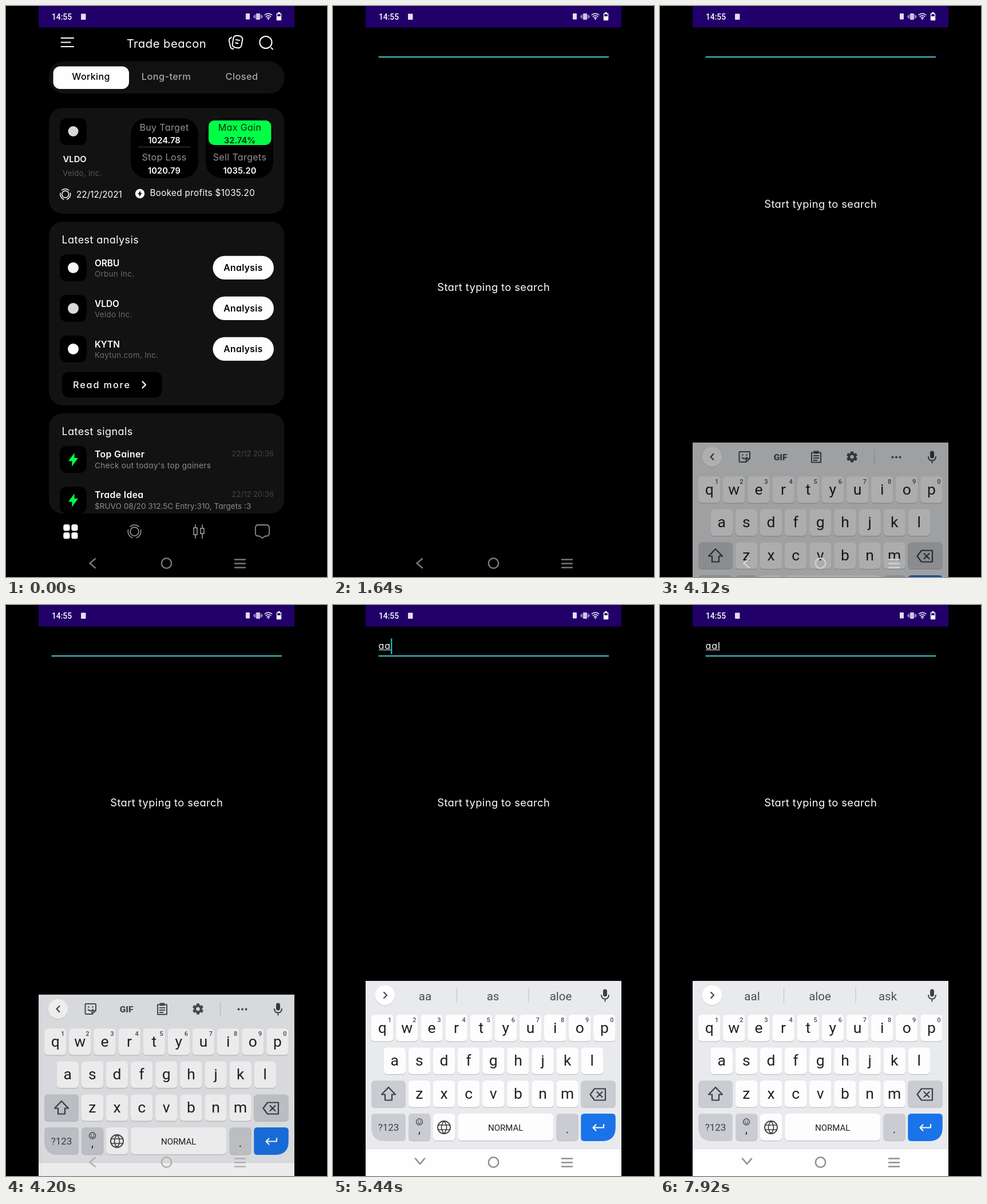
Animation, 561 px wide and 998 px high, one loop 8000 ms. Source, as an HTML page:

```html
<!DOCTYPE html>
<html lang="en">
<head>
<meta charset="utf-8">
<title>Stock app search</title>
<style>
html, body { margin: 0; width: 100%; height: 100%; overflow: hidden; background: #000; }
svg { display: block; width: 100vw; height: 100vh; }
text { font-family: Inter, "Open Sans", sans-serif; font-feature-settings: "cv11"; letter-spacing: .023em; white-space: pre; }
.num { letter-spacing: 0; }
.wide { letter-spacing: 1.9px; }
.typed { letter-spacing: .9px; }
.sys { font-family: Roboto, Arial, sans-serif; letter-spacing: 0; }
.line { fill: none; stroke-linecap: round; stroke-linejoin: round; }

.home, .search, .cursor, .message, .tools, .words, .press, .board, .nav, .back {
  animation: 8s step-end infinite both;
}
.home { animation-name: home; }
.search { animation-name: search; }
.cursor { animation-name: cursor; }
.message { animation-name: message; }
.tools { animation-name: tools; }
.w1 { animation-name: w1; }
.w2 { animation-name: w2; }
.w3 { animation-name: w3; }
.press-a { animation-name: pressA; }
.press-l { animation-name: pressL; }
.board { animation-name: board; }
.nav { animation-name: nav; animation-timing-function: linear; }
.back { animation-name: back; transform-origin: 151.5px 973.5px; }

@keyframes home { 0% { opacity: 1 } 19%, 100% { opacity: 0 } }
@keyframes search { 0% { opacity: 0 } 19%, 100% { opacity: 1 } }
@keyframes cursor {
  0%, 31.5%, 43.5%, 50% { opacity: 0; transform: none }
  25%, 37.5%, 44%, 56.5% { opacity: 1; transform: none }
  62.5% { opacity: 0; transform: none }
  64.5% { opacity: 1; transform: translateX(10.7px) }
  67.5% { opacity: 1; transform: translateX(21px) }
  74% { opacity: 0; transform: translateX(21px) }
  78.5%, 91% { opacity: 1; transform: translateX(25px) }
  84.5%, 97%, 100% { opacity: 0; transform: translateX(25px) }
}
@keyframes message { 0% { transform: translateY(146px) } 50.5% { transform: translateY(.7px) } 52%, 100% { transform: none } }
@keyframes board {
  0% { transform: translateY(345px); opacity: 0 }
  50% { transform: translateY(341px); opacity: 0; animation-timing-function: cubic-bezier(.333, .667, .667, 1) }
  53.42%, 100% { transform: none; opacity: 1 }
}
@keyframes nav { 0%, 50% { stroke: #777 } 51.5% { stroke: #d2d2d2 } 53.5%, 100% { stroke: #8e8e8e } }
@keyframes back {
  0% { transform: none }
  52% { transform: none; animation-timing-function: ease-in-out }
  57.25%, 100% { transform: translateY(-1.5px) rotate(-90deg) }
}
@keyframes tools { 0% { opacity: 1 } 64.5%, 100% { opacity: 0 } }
@keyframes w1 { 0% { opacity: 0 } 64.5% { opacity: 1 } 67.5%, 100% { opacity: 0 } }
@keyframes w2 { 0% { opacity: 0 } 67.5% { opacity: 1 } 78.5%, 100% { opacity: 0 } }
@keyframes w3 { 0% { opacity: 0 } 78.5%, 100% { opacity: 1 } }
@keyframes pressA { 0%, 64.5%, 67.5%, 100% { opacity: 0 } 63.5%, 66.5% { opacity: 1 } }
@keyframes pressL { 0%, 78.5%, 100% { opacity: 0 } 76% { opacity: 1 } }
</style>
</head>
<body>
<svg id="stage" viewBox="0 0 561 998" preserveAspectRatio="none"></svg>
<script>
const rect = (x, y, w, h, r, fill) =>
  `<rect x="${x}" y="${y}" width="${w}" height="${h}" rx="${r}" fill="${fill}"/>`;
const disc = (x, y, r, fill) => `<circle cx="${x}" cy="${y}" r="${r}" fill="${fill}"/>`;
const ring = (x, y, r, color, w) =>
  `<circle class="line" cx="${x}" cy="${y}" r="${r}" stroke="${color}" stroke-width="${w}"/>`;
const line = (d, color, w) => `<path class="line" d="${d}" stroke="${color}" stroke-width="${w}"/>`;
const fill = (d, color) => `<path d="${d}" fill="${color}"/>`;
const group = (cls, ...parts) => `<g class="${cls}">${parts.join('')}</g>`;
const at = (x, y, ...parts) => `<g transform="translate(${x} ${y})">${parts.join('')}</g>`;

function text(x, y, str, size, color, { anchor = 'start', weight = 400, cls = '' } = {}) {
  return `<text x="${x}" y="${y}" font-size="${size}" fill="${color}" text-anchor="${anchor}"` +
    ` font-weight="${weight}" class="${cls}">${str}</text>`;
}
const mid = (x, y, str, size, color, weight = 400, cls = '') =>
  text(x, y, str, size, color, { anchor: 'middle', weight, cls });

const CARD = '#121212', GREEN = '#00ff47', GREY = '#949494', INK = '#202124', TOOL = '#4a4c50';
const BOLT = 'M2 -12L-8.5 2.5H-2L-2.5 12L8.5 -3H2Z';

// Ring between three arcs
const target = (x, y, k, color, w) => at(x, y, ring(0, 0, 6 * k, color, w),
  line(`M${-6 * k} ${-7 * k}A${9.2 * k} ${9.2 * k} 0 0 1 ${6 * k} ${-7 * k}` +
    `M${-8.8 * k} ${-2 * k}A${9.2 * k} ${9.2 * k} 0 0 0 ${-3 * k} ${8.7 * k}` +
    `M${8.8 * k} ${-2 * k}A${9.2 * k} ${9.2 * k} 0 0 1 ${3 * k} ${8.7 * k}`, color, w));

function statusBar() {
  return rect(57, 0, 447, 37.5, 0, '#210069') +
    text(80, 24, '14:55', 13.8, '#fff', { weight: 500, cls: 'sys' }) +
    rect(131, 13.5, 8.5, 10.5, 1, '#e4dcf2') +
    rect(419, 13, 7, 10.5, 1, '#e4dcf2') +
    rect(437, 13, 7, 11, 1, '#cfc3e6') +
    line('M435.3 15.5v6M445.7 15.5v6M433.3 17v3M447.7 17v3', '#e4dcf2', 1.1) +
    line('M452.3 15.5q6.2 -4.6 12.4 0M454.2 18.3q4.3 -3.2 8.6 0M456.2 20.8q2.3 -1.6 4.6 0', '#fff', 1.5) +
    disc(458.5, 22.8, 1.2, '#fff') +
    rect(475, 11, 4, 3, .5, '#fff') +
    line('M473.5 13.5h7v11h-7z', '#fff', 1.4) + rect(473, 18, 8, 7, 1, '#fff');
}

function header() {
  const sheet = `<rect class="line" x="-8" y="-10.5" width="16" height="21" rx="5.5" stroke="#fff" stroke-width="2"/>`;
  return line('M96.5 56h21.5M96.5 63.5h16M96.5 71h21.5', '#fff', 2) +
    mid(280.5, 73, 'Trade beacon', 20.3, '#fff') +
    at(404.5, 62.5, `<g transform="rotate(10)">${sheet}${line('M-3 -3h6.5M-3 2.5h4.5', '#fff', 1.9)}</g>`) +
    line('M394 55q-5 2 -4 6.500l2 9q1 4.500 5.500 4.500', '#fff', 1.9) +
    ring(454, 63.5, 10.6, '#fff', 2) + line('M463.5 73l2.5 2.5', '#fff', 2);
}

function tabs() {
  return rect(75, 97, 411.5, 56, 26, '#111') + rect(82.5, 105.5, 132.5, 39.5, 12, '#fefefe') +
    mid(148.5, 129, 'Working', 16, '#000', 550) +
    mid(280, 129, 'Long-term', 16.4, '#a6a6a6', 500) +
    mid(412, 129, 'Closed', 16.4, '#a6a6a6', 500);
}

const tile = y => rect(94, y, 47, 47, 12, '#000');
const pair = (x, y, label, value, color, ink) =>
  mid(x, y, label, 16, color) + mid(x, y + 22.5, value, 14.8, ink, 600, 'num');

function signalCard() {
  return rect(75, 178, 411.5, 185, 24, CARD) + tile(196) + disc(117.5, 219, 9, '#d9d9d9') +
    text(99.5, 273, 'VLDO', 14.8, '#fff', { weight: 600, cls: 'num' }) +
    text(99, 297, 'Veldo, Inc.', 13.2, '#595959') +
    rect(218, 196, 118, 105, 28, '#000') + rect(349, 196, 118, 105, 28, '#000') +
    rect(354, 200, 109.5, 43, 10, GREEN) +
    pair(276.5, 217.5, 'Buy Target', '1024.78', GREY, '#fff') +
    line('M231 246.5h91', '#333', 1.3) +
    pair(276.5, 270, 'Stop Loss', '1020.79', GREY, '#fff') +
    pair(408.5, 217.5, 'Max Gain', '32.74%', '#04260e', '#04260e') +
    pair(408.5, 270, 'Sell Targets', '1035.20', GREY, '#fff') +
    target(103.7, 329, 1, '#fff', 1.6) +
    text(123, 335, '22/12/2021', 15.3, '#fff', { cls: 'num' }) +
    disc(234, 328, 8.2, '#fff') +
    at(234, 328, `<g transform="scale(.45)">${fill(BOLT, CARD)}</g>`) +
    text(251.5, 332, 'Booked profits $1035.20', 15.2, '#fff');
}

function analysisCard() {
  const stocks = [['ORBU', 'Orbun Inc.', '#f5f5f5'], ['VLDO', 'Veldo Inc.', '#d9d9d9'], ['KYTN', 'Kaytun.com, Inc.', '#fff']];
  const rows = stocks.map(([ticker, name, color], i) => {
    const y = 434 + 71 * i;
    return tile(y) + disc(117.5, y + 23.5, 9.5, color) +
      text(155, y + 21, ticker, 15.4, '#fff', { weight: 600, cls: 'num' }) +
      text(155, y + 39, name, 13.4, '#6b6b6b') +
      rect(361.5, y + 2.7, 106.5, 41.3, 20.6, '#fefefe') +
      mid(414.5, y + 29, 'Analysis', 15.7, '#000', 600);
  });
  return rect(75, 377, 411.5, 321, 24, CARD) +
    text(97.5, 415, 'Latest analysis', 18, '#fff') + rows.join('') +
    rect(98, 639.5, 174.5, 45, 12, '#000') +
    text(117, 667.5, 'Read more', 16.2, '#fff', { weight: 550, cls: 'wide' }) +
    line('M238.5 656.5l5.5 5.5l-5.5 5.5', '#fff', 2.3);
}

function newsCard() {
  const items = [['Top Gainer', "Check out today's top gainers", ''],
    ['Trade Idea', '$RUVO 08/20 312.5C Entry:310, Targets :3', 'num']];
  const rows = items.map(([title, note, cls], i) => {
    const y = 769 + 71 * i;
    return tile(y) + at(117.5, y + 24, fill(BOLT, GREEN)) +
      text(155, y + 20, title, 15.8, '#fff', { weight: 580 }) +
      text(155, y + 39, note, 13.6, '#8c8c8c', { cls }) +
      text(468, y + 18, '22/12 20:36', 13, '#454545', { anchor: 'end', cls: 'num' });
  });
  return `<clipPath id="news"><rect x="75" y="712" width="411.5" height="175" rx="24"/></clipPath>` +
    `<g clip-path="url(#news)">${rect(75, 712, 411.5, 175, 0, CARD)}` +
    text(97.5, 750, 'Latest signals', 18, '#fff') + rows.join('') + '</g>';
}

function tabBar() {
  const squares = [0, 1, 2, 3].map(i => rect(100.3 + 14 * (i % 2), 906 + 14 * (i >> 1), 11.2, 11.2, 3.5, '#fff'));
  return squares.join('') + target(224.5, 918.5, 1.25, '#8a8a8a', 1.8) +
    line('M328 912h6v12h-6zM331 907v5M331 924v6M340 913h6v9h-6zM343 907v6M343 922v8', '#8a8a8a', 1.8) +
    line('M441 907h14q5 0 5 5v10q0 4.5 -5 4.5h-2l-5 3.5l-5 -3.5h-2q-5 0 -5 -4.5v-10q0 -5 5 -5z', '#8a8a8a', 1.8);
}

// Keyboard
const keyBox = (x, y, w, color, h = 46.5) =>
  rect(x, y + 1.2, w, h, 6, '#bfc1c5') + rect(x, y, w, h, 6, color);
const WHITE = '#fdfdfd', DIM = '#cbccd2', STEP = 43.13;
const rowsOfKeys = [['qwertyuiop', 86.2, 716], ['asdfghjkl', 107.8, 773.5], ['zxcvbnm', 150.9, 831.3]];

function letters() {
  return rowsOfKeys.map(([keys, x0, y], row) => [...keys].map((k, i) => {
    const x = x0 + STEP * i;
    return keyBox(x - 19.2, y, 38.4, WHITE) + mid(x, y + 31.5, k, 26.5, INK, 400, 'sys') +
      (row ? '' : mid(x + 13, y + 13, (i + 1) % 10, 11, TOOL, 500, 'sys'));
  }).join('')).join('');
}

function controls() {
  const corner = (x, flip, color) =>
    fill(flip ? `M${x} 895q0 -6 6 -6h48.5q6 0 6 6v18q0 24 -24 24h-30.5q-6 0 -6 -6z`
      : `M${x} 895q0 -6 6 -6h48q6 0 6 6v36q0 6 -6 6h-30q-24 0 -24 -24z`, color);
  return keyBox(67, 831.3, 60, DIM) + keyBox(433.3, 831.3, 60.5, DIM) +
    line('M97 843l12 12.5h-6v10h-12v-10h-6z', '#3c4043', 2.2) +
    line('M457 845.5h19v20h-19l-7.5 -10zM461.5 851l9 9M470.5 851l-9 9', '#3c4043', 2.2) +
    corner(67, false, DIM) + mid(97, 919, '?123', 17, '#3c4043', 400, 'sys') +
    keyBox(132, 889, 38.4, DIM, 47) + ring(151, 903.5, 5.5, '#3c4043', 1.3) +
    disc(149, 902, .9, '#3c4043') + disc(153, 902, .9, '#3c4043') + line('M148.5 905q2.5 2.6 5 0', '#3c4043', 1.2) +
    mid(151, 923, ',', 20, INK, 400, 'sys') +
    keyBox(175, 889, 38.4, WHITE, 47) + ring(194, 913, 11, '#3c4043', 1.8) +
    line('M183.5 909h21M183.5 917h21M194 902q-9 11 0 22q9 -11 0 -22', '#3c4043', 1.6) +
    keyBox(218.2, 889, 167, WHITE, 47) + mid(301.7, 918.5, 'NORMAL', 15, INK, 400, 'sys') +
    keyBox(390.5, 889, 38.4, DIM, 47) + mid(409.5, 923, '.', 20, INK, 400, 'sys') +
    corner(433.3, true, '#1a73e8') +
    line('M473 908v5.5h-18M459.5 908.5l-5 5l5 5', '#fff', 2.2);
}

function toolbar() {
  const teeth = [0, 60, 120, 180, 240, 300].map(a =>
    `<g transform="rotate(${a})">${rect(-2.7, -9.5, 5.4, 4.5, 1, TOOL)}</g>`).join('');
  return disc(91, 683.2, 17.5, '#cfd1d5') + disc(91, 682, 17.3, '#fff') +
    group('tools',
      line('M93.5 677l-5 5l5 5', '#3c4043', 2),
      line('M140 673h15.5q1.5 0 1.5 1.5v10l-6.5 6.5h-10.5q-1.5 0 -1.5 -1.5v-15q0 -1.5 1.5 -1.5M157 685h-5q-1.5 0 -1.5 1.5v4.5M143.5 683q4 4.5 8.5 0', TOOL, 2),
      disc(144.5, 678.5, 1.3, TOOL), disc(151.5, 678.5, 1.3, TOOL),
      mid(210.5, 687.5, 'GIF', 15.5, TOOL, 900, 'sys'),
      line('M265 674.5h16v17h-16zM268.5 680h9M268.5 684h9M268.5 688h6', TOOL, 2),
      rect(268.5, 671.5, 9, 5, 1, TOOL),
      at(335.5, 682, teeth, ring(0, 0, 5.2, TOOL, 4)),
      line('M374.5 669.5v25', '#c3c5c9', 1.2),
      [406.5, 413, 419.5].map(x => disc(x, 682.5, 2, TOOL)).join('')) +
    rect(472, 671.5, 7, 13, 3.5, '#3c4043') +
    line('M469 682q.5 6.5 6.5 6.5t6.5 -6.5M475.5 688.5v4', '#3c4043', 2);
}

const suggestions = [['a', 'as', 'and'], ['aa', 'as', 'aloe'], ['aal', 'aloe', 'ask']];

function wordBar(list, n) {
  return group('words w' + (n + 1),
    line('M89 677l5 5l-5 5', '#3c4043', 2),
    line('M216.5 669v26M342 669v26', '#c3c5c9', 1.2),
    list.map((w, i) => mid(161 + 118.5 * i, 691, w, 20.5, '#4c4e52', 400, 'sys')).join(''));
}

const popup = (x, key) => group('press press-' + key,
  rect(x - 28, 706, 56, 60, 9, '#c3c5c9'), rect(x - 28, 705, 56, 60, 9, '#fff'),
  mid(x, 745, key, 32, INK, 400, 'sys'));

function keyboard() {
  return group('board', rect(57, 657, 447, 345, 0, '#e8eaed'),
    toolbar(), suggestions.map(wordBar).join(''), letters(), controls(),
    rect(57, 950, 447, 52, 0, '#fefefe'), rect(57, 950, 447, 1, 0, '#dcdde0'),
    popup(107.8, 'a'), popup(107.8 + STEP * 8, 'l'));
}

function entry(word, n) {
  const w = [10.5, 21, 25][n];
  return group('words w' + (n + 1), text(79.5, 76.5, word, 16, '#fff', { cls: 'typed' }),
    rect(80, 78, w, 1, 0, '#fff'));
}

function searchPage() {
  return rect(79.5, 88, 402.5, 2.2, 0, '#47b7bc') +
    ['a', 'aa', 'aal'].map(entry).join('') +
    group('cursor', rect(80, 58.5, 2.4, 27.5, 0, '#22b2ad')) +
    group('message', mid(280.7, 351.7, 'Start typing to search', 18.3, '#fff')) +
    keyboard();
}

function navBar() {
  const shape = d => `<path class="line" d="${d}" stroke-width="2.5"/>`;
  return group('nav',
    group('back', shape('M156 966l-9.5 8l9.5 8')),
    '<circle cx="280.5" cy="974" r="8.7" fill="none" stroke-width="2.5"/>',
    shape('M400 967.5h18M400 974.5h18M400 981.5h18'));
}

document.getElementById('stage').innerHTML =
  rect(0, 0, 561, 998, 0, '#000') +
  group('home', header(), tabs(), signalCard(), analysisCard(), newsCard(), tabBar()) +
  group('search', searchPage()) + statusBar() + navBar();
</script>
</body>
</html>
```
